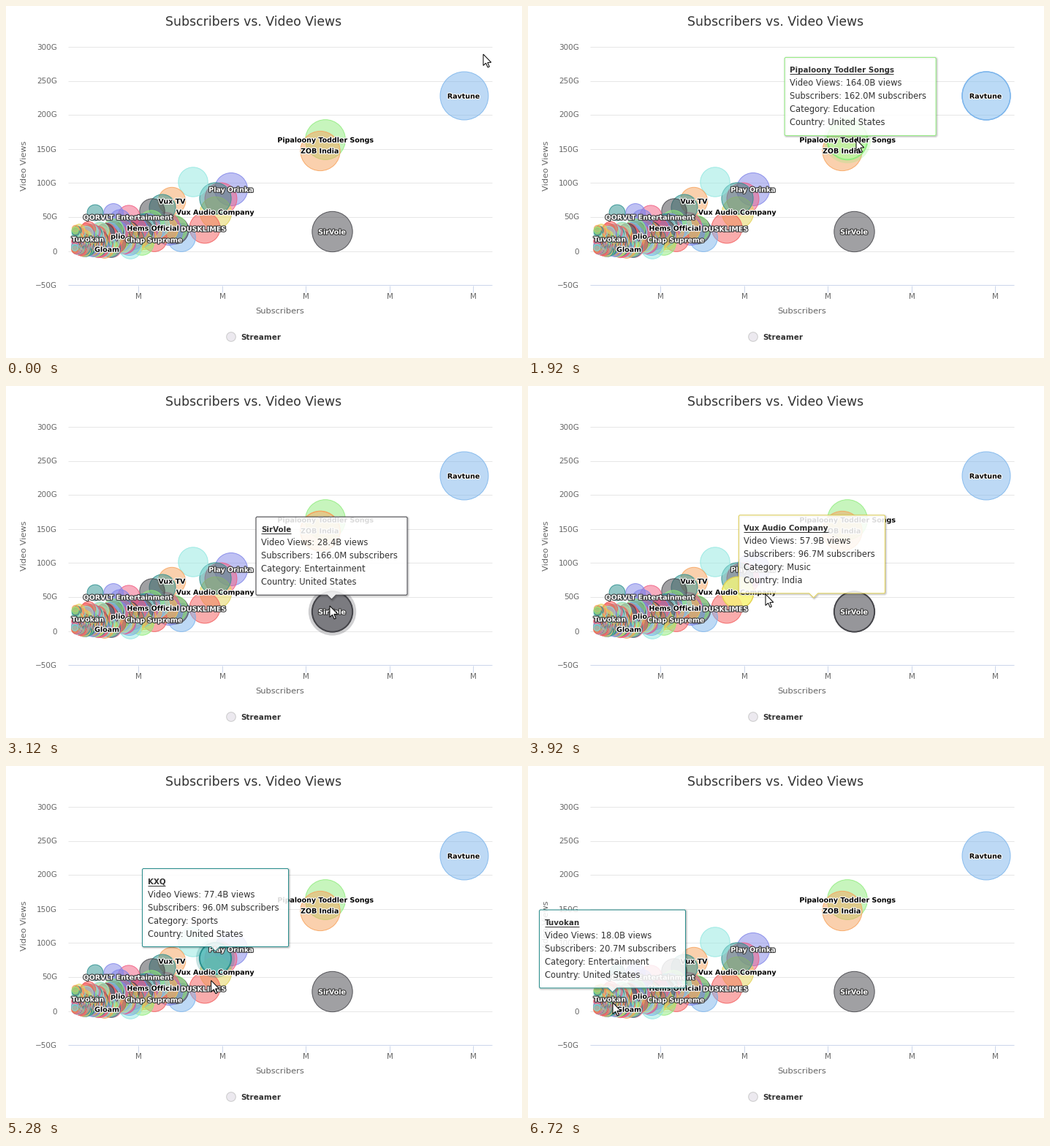
Animation of 706 by 482 pixels, one loop 6.8 s. Source, as a matplotlib script:

```python
import numpy as np
import matplotlib.pyplot as plt
from matplotlib.animation import FuncAnimation
from matplotlib.collections import PatchCollection
from matplotlib.colors import to_rgb
from matplotlib.patches import Circle, Polygon
from matplotlib.patheffects import withStroke
from matplotlib.textpath import TextPath

W, H, DPI = 706, 482, 64
STEP, FRAMES = 80, 85
PX = 72 / DPI  # points per pixel
plt.rcParams["font.family"] = "DejaVu Sans"

PALETTE = ["#7cb5ec", "#434348", "#90ed7d", "#f7a35c", "#8085e9",
           "#f15c80", "#e4d354", "#2b908f", "#f45b5b", "#91e8e1"]

fig = plt.figure(figsize=(W / DPI, H / DPI), dpi=DPI, facecolor="white")
ax = fig.add_axes([0, 0, 1, 1])
ax.set(xlim=(0, W), ylim=(H, 0))
ax.axis("off")


def put(x, y, s, size, color="#666666", ha="center", **kw):
    return ax.text(x, y, s, fontsize=size * PX, color=color, ha=ha,
                   va=kw.pop("va", "baseline"), **kw)


def line(x, y, color, z=0):
    return ax.plot(x, y, color=color, lw=PX, zorder=z, solid_capstyle="butt")[0]


def radius(x):
    return 4.5 + 28.5 * np.sqrt(max(x - 95, 0) / 532)


# axes, title and legend
put(339, 27, "Subscribers vs. Video Views", 17.3, "#333333")
for k in range(8):
    y = round(55 + 46.6 * k) + 0.5
    line([85, 665], [y, y], "#ccd6eb" if k == 7 else "#e6e6e6")
    value = 300 - 50 * k
    label = f"{value}G".replace("-", "\u2212") if value else "0"
    put(70, y + 4, label, 10.4, ha="right")
for k in range(5):
    x = round(180.5 + 114.4 * k) + 0.5
    line([x, x], [383, 392], "#ccd6eb")
    put(x + 0.5, 401, "M", 10.4)
put(375, 421, "Subscribers", 11.4)
put(25, 219, "Video Views", 11.4, rotation=90, va="center")
ax.add_patch(Circle((308, 453), 6.3, fc="#ece9ef", ec="#cccccc", lw=PX))
put(321, 457, "Streamer", 10.4, "#333333", ha="left", weight="bold")

# bubbles, largest audience first
SPOTS = [(627, 123), (446.5, 309), (437, 183), (430, 198.5), (308, 251),
         (294, 264), (287, 283), (286.5, 263.5), (272, 304), (256, 241),
         (240, 317), (231, 307), (229, 305), (227, 267), (223, 309),
         (219, 301), (217, 306), (214, 276), (203, 319), (206, 300),
         (201, 304), (200, 281), (199, 297), (196, 309), (194, 301),
         (191, 306), (189, 317), (188, 301), (187, 311), (186, 304),
         (186, 314), (185, 308), (186, 325)]
HEAD = [(x, y, PALETTE[i % 10]) for i, (x, y) in enumerate(SPOTS)]
SMALL = (115.5, 320, PALETTE[7])
TAIL = [SMALL, (168, 288, PALETTE[5]), (147, 284, PALETTE[4]),
        (122, 283, PALETTE[7]), (156, 293, PALETTE[4])]

rng = np.random.default_rng(12)
COUNT = 420
for i in range(len(SPOTS), COUNT):
    subs = 12.3 * (COUNT / i) ** 0.55
    views = min(0.42 * subs * np.exp(rng.normal(0, 0.75)), 33 - rng.uniform(0, 6))
    TAIL.append((66.2 + 2.289 * subs, 335.3 - 0.932 * views, PALETTE[i % 10]))
TAIL.sort(key=lambda b: -b[0])


def add_bubbles(group, z):
    ax.add_collection(PatchCollection(
        [Circle((x, y), radius(x)) for x, y, _ in group],
        facecolors=[to_rgb(c) + (0.5,) for *_, c in group],
        edgecolors=[to_rgb(c) + (0.85,) for *_, c in group],
        linewidths=PX, zorder=z))


add_bubbles(HEAD[:10], 1)
add_bubbles(HEAD[10:] + TAIL, 3)

LABELS = [("Ravtune", 626, 123, 0), ("Pipaloony Toddler Songs", 437, 183, 0),
          ("ZOB India", 429, 198, 0), ("SirVole", 446, 309, 1),
          ("Play Orinka", 308, 251, 1), ("Vux TV", 227, 267, 0),
          ("Vux Audio Company", 286, 282, 0),
          ("QORVLT Entertainment", 167, 289, 1), ("Hems Official", 201, 304, 0),
          ("DUSKLIMES", 270, 305, 1), ("Tuvokan", 112, 319, 1),
          ("plio", 153, 315, 0), ("Chap Supreme", 202, 320, 1),
          ("Gloam", 138, 333, 0)]
for name, x, y, light in LABELS:
    ink, edge = ("white", "#3a3a3a") if light else ("black", "white")
    put(x, y + 3.7, name, 9.5, ink, weight="bold", zorder=4,
        path_effects=[withStroke(linewidth=2.2 * PX, foreground=edge)])

# start time, bubble, name, views, subscribers, category, country
HOVERS = [
    (200, HEAD[0], "Ravtune", "228.0", "245.0", "Music", "India"),
    (1760, HEAD[2], "Pipaloony Toddler Songs", "164.0", "162.0", "Education",
     "United States"),
    (2260, HEAD[3], "ZOB India", "148.0", "159.0", "Shows", "India"),
    (2900, HEAD[1], "SirVole", "28.4", "166.0", "Entertainment", "United States"),
    (3886, HEAD[6], "Vux Audio Company", "57.9", "96.7", "Music", "India"),
    (4440, HEAD[7], "KXQ", "77.4", "96.0", "Sports", "United States"),
    (5300, HEAD[8], "DUSKLIMES", "32.1", "89.8", "People", "South Korea"),
    (5660, HEAD[20], "Hems Official", "33.4", "59.3", "Music", "India"),
    (6080, SMALL, "Tuvokan", "18.0", "20.7", "Entertainment", "United States"),
]
TIP_H = 107
PATH = np.array([
    (0, 653, 66), (400, 632, 112), (480, 632, 112), (1200, 620, 126),
    (1440, 585, 137), (1800, 455, 178), (2160, 437, 192), (2480, 413, 205),
    (2720, 425, 240), (3040, 444, 300), (3500, 438, 306), (3920, 325, 285),
    (4300, 296, 290), (4720, 291, 278), (5200, 286, 288), (5440, 270, 305),
    (5620, 235, 305), (5840, 183, 303), (6160, 125, 317), (6720, 116, 324)])


def tip_width(hover):
    return 172 + 7 * len(hover[4])


def tip_goal(hover):
    """Resting box corner and anchor point."""
    (x, y, _), w = hover[1], tip_width(hover)
    top = y - 16 - TIP_H
    if top < 20:
        top = y + 16
    return np.array([min(x - w / 2, 674.5 - w), top, x, y])


def hover_state(t):
    """Current hover number and the eased tooltip position."""
    now, pos = -1, None
    for k, hover in enumerate(HOVERS):
        if t < hover[0]:
            break
        end = min(t, HOVERS[k + 1][0]) if k + 1 < len(HOVERS) else t
        goal = tip_goal(hover)
        lag = (2 / 3) ** ((end - hover[0]) / 32)
        pos = goal if pos is None else goal + (pos - goal) * lag
        now = k
    return now, pos


def tip_outline(x, y, w, px, py):
    r, b, c = x + w, y + TIP_H, 1.2
    inside = x + 8 < px < r - 8
    up = [(px - 6, y), (px, y - 6), (px + 6, y)] if inside and py < y else []
    down = [(px + 6, b), (px, b + 6), (px - 6, b)] if inside and py > b else []
    return np.array([(x, y + c), (x + c, y), *up, (r - c, y), (r, y + c),
                     (r, b - c), (r - c, b), *down, (x + c, b), (x, b - c)])


def lighten(color):
    return np.minimum(np.array(to_rgb(color)) + 0.2, 1)


def disc(z):
    return ax.add_patch(Circle((0, 0), 1, visible=False, zorder=z))


halo, hot, fading = disc(2), disc(2.1), disc(2.2)

blank = np.zeros((3, 2))
shadows = [ax.add_patch(Polygon(blank, fill=False, ec=(0, 0, 0, a), lw=lw * PX,
                                joinstyle="round", zorder=5))
           for a, lw in ((0.04, 5), (0.08, 3), (0.12, 1))]
tip = ax.add_patch(Polygon(blank, fc=(1, 1, 1, 0.86), lw=PX,
                           joinstyle="round", zorder=6))
rows = [put(0, 0, "", 10.3 if k == 0 else 11.5, "#333333", ha="left", zorder=7,
            weight="bold" if k == 0 else "normal") for k in range(5)]
underline = line([0, 0], [0, 0], "#333333", 7)
tooltip = [*shadows, tip, *rows, underline]

ARROW = np.array([(0, 0), (0, 15.5), (3.6, 12.2), (6.2, 18), (8.4, 17),
                  (5.9, 11.4), (10.8, 11.2)])
cursor = ax.add_patch(Polygon(ARROW, fc="white", ec="black", lw=PX, zorder=9))

NAME_W = {h[2]: TextPath((0, 0), h[2], size=10.3,
                         prop={"family": "DejaVu Sans", "weight": "bold"}
                         ).get_extents().x1 for h in HOVERS}


def show_tip(hover, pos):
    _, (_, _, color), name, views, subs, kind, land = hover
    outline = tip_outline(pos[0], pos[1], tip_width(hover), pos[2], pos[3])
    tip.set_xy(outline)
    tip.set_edgecolor(color)
    for shadow in shadows:
        shadow.set_xy(outline + 1)
    lines = [name, f"Video Views: {views}B views",
             f"Subscribers: {subs}M subscribers",
             f"Category: {kind}", f"Country: {land}"]
    x, y = pos[0] + 7, pos[1] + 21
    for k, (row, s) in enumerate(zip(rows, lines)):
        row.set_text(s)
        row.set_position((x, y + 18 * k))
    underline.set_data([x, x + NAME_W[name]], [y + 2, y + 2])


def show_hot(bubble, age):
    x, y, color = bubble
    r = radius(x)
    grow = min(age / 150, 1)
    halo.set(center=(x, y), radius=r + 5 * grow, fc=to_rgb(color) + (0.25,),
             ec="none")
    hot.set(center=(x, y), radius=r, fc=(*lighten(color), 0.7), ec=color,
            lw=(1 + grow) * PX)


def update(frame):
    t = frame * STEP
    cursor.set_xy(ARROW + [np.interp(t, PATH[:, 0], PATH[:, c]) for c in (1, 2)])
    now, pos = hover_state(t)
    for artist in [*tooltip, halo, hot]:
        artist.set_visible(now >= 0)
    fading.set_visible(False)
    if now >= 0:
        hover = HOVERS[now]
        age = t - hover[0]
        show_tip(hover, pos)
        show_hot(hover[1], age)
        if now > 0 and age < 320:
            x, y, color = HOVERS[now - 1][1]
            left = 1 - age / 320
            fading.set(center=(x, y), radius=radius(x), visible=True, ec=color,
                       fc=(*lighten(color), 0.25 * left), lw=(1 + left) * PX)
    return []


anim = FuncAnimation(fig, update, frames=FRAMES, interval=STEP, repeat=True,
                     repeat_delay=0, blit=False)
plt.show()
```
